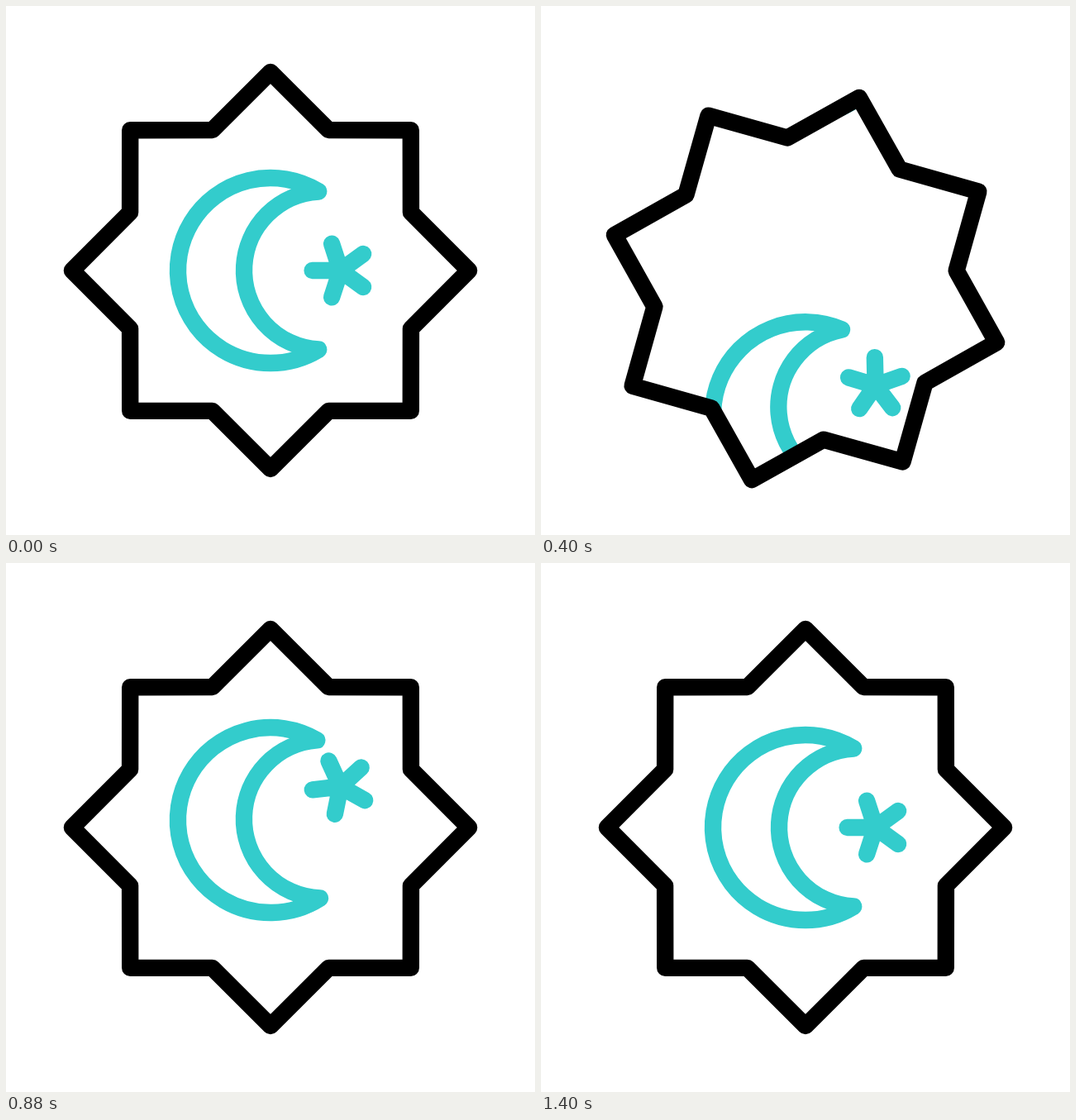
An HTML page with a canvas for the animation above (1.48 s loop, 640x640 px).

```html
<!DOCTYPE html>
<html lang="en">
<head>
<meta charset="utf-8">
<title>Crescent and star</title>
<style>
  html, body { margin: 0; width: 100%; height: 100%; overflow: hidden; background: #fff; }
  canvas { display: block; width: 640px; height: 640px; }
</style>
</head>
<body>
<canvas id="stage" width="640" height="640"></canvas>
<script>
const LOOP = 1480, STEP = 40, RAD = Math.PI / 180;
const TEAL = '#33cccc', LINE = 20.4, MID = 320;
const ctx = document.getElementById('stage').getContext('2d');

// Progress 0..1 between two times, along cubic-bezier(1/3, 0, x2, 1)
function ease(t, from, to, x2 = 2 / 3) {
  const x = Math.min(1, Math.max(0, (t - from) / (to - from)));
  let lo = 0, hi = 1, s = x;
  for (let i = 0; i < 24; i++) {
    s = (lo + hi) / 2;
    const bx = s * (1 - s) ** 2 + 3 * s * s * (1 - s) * x2 + s ** 3;
    if (bx < x) lo = s; else hi = s;
  }
  return s * s * (3 - 2 * s);
}

const polar = (r, deg) => [r * Math.cos(deg * RAD), r * Math.sin(deg * RAD)];

const octagram = new Path2D();
for (let i = 0; i < 16; i++) octagram.lineTo(...polar(i % 2 ? 183.9 : 240.1, i * 22.5));
octagram.closePath();

const moon = new Path2D();
const tip = Math.atan2(95.6, 58.2), hollow = Math.atan2(95.6, -5.5);
moon.arc(0, 0, 112, -tip, tip, true);
moon.arc(63.7, 0, 95.7, hollow, -hollow);
moon.closePath();

const spark = new Path2D();
for (let i = 0; i < 5; i++) {
  spark.moveTo(0, 0);
  spark.lineTo(...polar(34, 180 + 72 * i));
}

// Each shape turns and drifts in proportion to its distance from rest
function strokeAt(path, x, drop, turn, drift = 0) {
  ctx.save();
  ctx.translate(x + drop * drift, MID + drop);
  ctx.rotate(drop * turn * RAD);
  ctx.stroke(path);
  ctx.restore();
}

function draw(t) {
  const grow = 0.05 * (ease(t, 1000, 1200) - ease(t, 1200, 1400));
  const bob = 25.5 * ease(t, 80, 360) - 46.5 * ease(t, 360, 600) + 21 * ease(t, 600, 800);
  const frame = new Path2D();
  frame.addPath(octagram, new DOMMatrix()
    .translate(MID + 30 * grow, MID + bob + 50 * grow)
    .scale(1 + grow)
    .rotate(45 * ease(t, 80, 800, 0.83)));

  ctx.fillStyle = '#fff';
  ctx.fillRect(0, 0, 640, 640);
  ctx.lineCap = ctx.lineJoin = 'round';

  ctx.save();
  ctx.clip(frame);
  ctx.strokeStyle = TEAL;
  ctx.lineWidth = LINE;
  // One copy falls out below while the next drops in from above
  strokeAt(moon, MID, 418 * ease(t, 80, 800), -0.047);
  strokeAt(moon, MID, 430 * (ease(t, 80, 955) - 1), 0.124, 0.009);
  strokeAt(spark, 404.6, 463 * ease(t, 80, 960), 0.12);
  strokeAt(spark, 404.6, 346 * (ease(t, 240, 1080) - 1), 0.1325);
  ctx.restore();

  ctx.strokeStyle = '#000';
  ctx.lineWidth = LINE * (1 + grow);
  ctx.stroke(frame);
}

const start = performance.now();
function tick() {
  const t = (performance.now() - start) % LOOP;
  draw(Math.floor(t / STEP) * STEP);
  requestAnimationFrame(tick);
}
tick();
</script>
</body>
</html>
```
